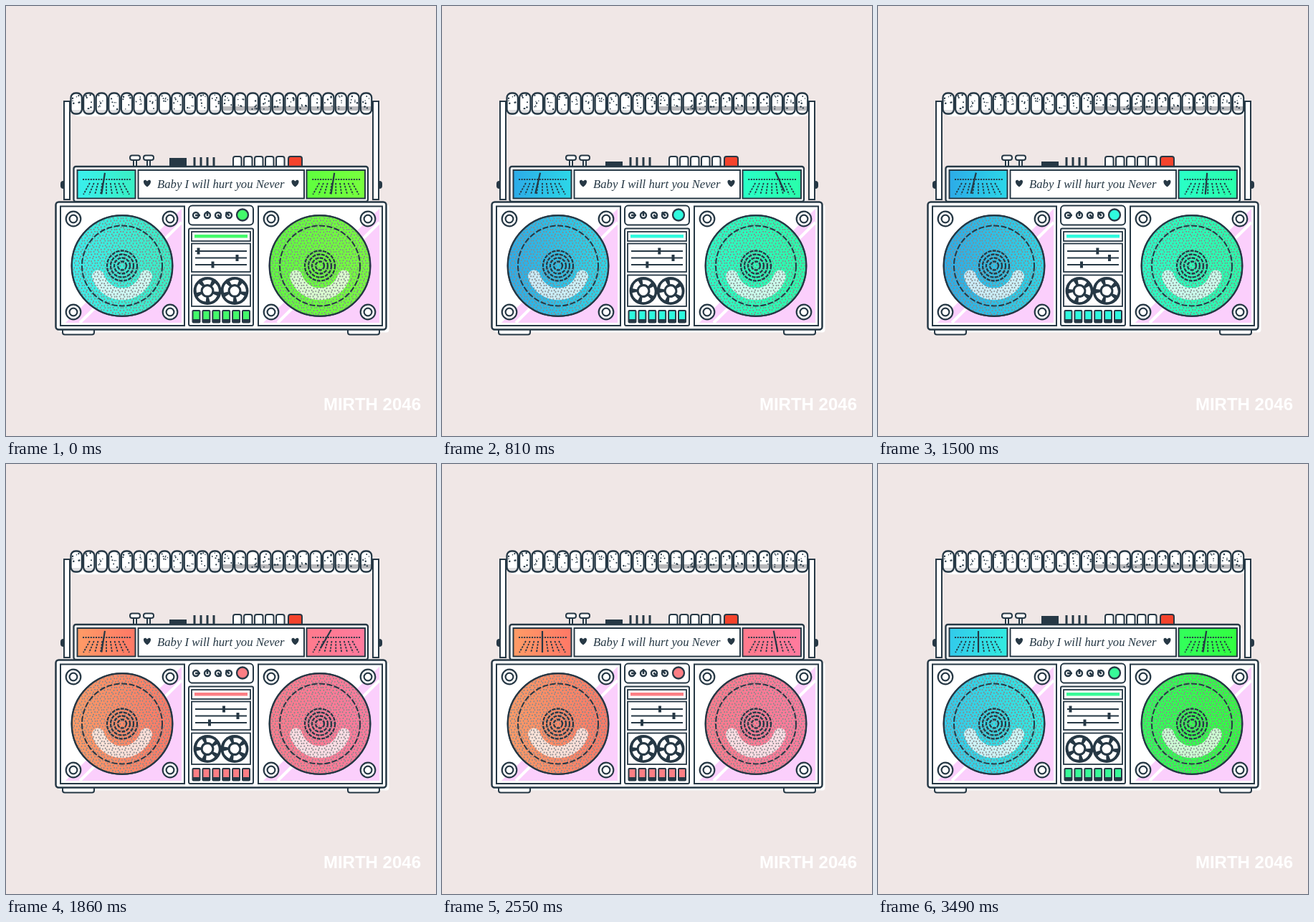
Recreate the animation shown at these times as an HTML page. Size 600x600 px, loop 3520 ms.

```html
<!DOCTYPE html>
<html lang="en">
<head>
<meta charset="utf-8">
<title>Boombox</title>
<style>
html, body { margin: 0; width: 100%; height: 100%; overflow: hidden; background: #f0e7e6; }
svg { display: block; width: 600px; height: 600px; }
.label { font: italic 16.7px "Liberation Serif", "Times New Roman", serif; fill: #263845; }
.sign { font: bold 24px "Liberation Sans", Arial, sans-serif; fill: #fff; }
</style>
</head>
<body>
<svg id="stage" viewBox="0 0 600 600"></svg>
<script>
const LOOP = 3520, STEP = 30, LAST = 3490;
const INK = '#263845', PINK = '#fbcffc';
const stage = document.getElementById('stage');
const NS = 'http://www.w3.org/2000/svg';

function add(tag, attrs, parent = stage, text) {
  const el = document.createElementNS(NS, tag);
  for (const k in attrs) el.setAttribute(k, attrs[k]);
  if (text) el.textContent = text;
  parent.appendChild(el);
  return el;
}
// Rectangle given by its corners
const box = (x1, y1, x2, y2, rx = 0, o = {}, p) =>
  add('rect', { x: x1, y: y1, width: x2 - x1, height: y2 - y1, rx, fill: '#fff', stroke: INK, 'stroke-width': 2, ...o }, p);
const disc = (cx, cy, r, o = {}, p) =>
  add('circle', { cx, cy, r, fill: 'none', stroke: INK, 'stroke-width': 2, ...o }, p);
const path = (d, o = {}, p) =>
  add('path', { d, fill: 'none', stroke: INK, 'stroke-width': 2, ...o }, p);
const plain = { stroke: 'none' };

let seed = 17;
const rnd = () => (seed = seed * 16807 % 2147483647) / 2147483647;

const defs = add('defs', {});
const mesh = add('pattern', { id: 'mesh', width: 18, height: 31.2, patternUnits: 'userSpaceOnUse' }, defs);
const dots = { stroke: '#87898c', 'stroke-width': 2.1, 'stroke-linecap': 'round' };
for (const [x, y] of [[0, 0], [18, 0], [0, 31.2], [18, 31.2], [9, 15.6]]) {
  disc(x, y, 7.6, { ...dots, 'stroke-dasharray': '.1 3.88' }, mesh);
  disc(x, y, 3.4, { ...dots, 'stroke-dasharray': '.1 3.46' }, mesh);
}
function gradient(id) {
  const g = add('linearGradient', { id }, defs);
  return [0, 1].map(offset => add('stop', { offset }, g));
}
const stops = { left: gradient('left'), right: gradient('right') };

// White offset shadows
box(73, 277, 534.5, 455.5, 4, { fill: '#fff', ...plain });
box(98, 228, 508.5, 274, 3, { fill: '#fff', ...plain });
box(93, 125, 513, 154, 8, { fill: '#fff', ...plain });

// Handle
for (const x of [76, 517]) box(x, 244, x + 8, 255, 4, { fill: INK, ...plain });
for (const x of [81, 512]) box(x, 133, x + 8, 270);
for (let i = 0; i < 24; i++) {
  const x = 90.5 + i * 17.58;
  const shade = i > 11 ? '#b9b9bc' : '#dfdfe1';
  box(x, 121.5, x + 15.4, 150.5, 6.5, plain);
  path(`M${x} ${i > 11 ? 140 : 145}h15.4v4q0 2-7 2h-2q-6.4 0-6.4-2z`, { fill: shade, ...plain });
  for (let k = 0; k < 7; k++)
    disc(x + 2.5 + rnd() * 10.5, 124 + rnd() * 20, .7 + rnd() * .6, { fill: INK, ...plain });
  box(x, 121.5, x + 15.4, 150.5, 6.5, { fill: 'none', 'stroke-width': 2.3 });
}

// Controls on the top edge
for (const x of [180, 199]) {
  box(x - 2, 214, x + 2, 225);
  box(x - 7, 208.5, x + 7, 215, 3);
}
const key = box(228, 212, 252, 226, 0, { fill: INK, ...plain });
for (let i = 0; i < 4; i++) path(`M${263 + i * 9} 211v14`, { 'stroke-width': 3 });
for (let x = 317; x < 380; x += 15) box(x, 210, x + 11.5, 226, 3);
box(394, 210, 413, 227, 3, { fill: '#f4432c' });

// Upper unit
box(94.5, 224, 505, 273, 3, { 'stroke-width': 2.3 });
box(184.5, 229, 416, 268.5);
add('text', { x: 211, y: 254, class: 'label' }, stage, 'Baby I will hurt you Never');
for (const x of [197, 403.5])
  path(`M${x} 252.5C${x - 9} 246 ${x - 4} 239.5 ${x} 244.5C${x + 4} 239.5 ${x + 9} 246 ${x} 252.5z`, { fill: INK, ...plain });

function meter(x1, x2, side) {
  const cx = (x1 + x2) / 2;
  box(x1, 229, x2, 268.5, 0, { fill: `url(#${side})` });
  path(`M${cx - 33} 242h67`, { 'stroke-width': 2, 'stroke-dasharray': '2 1.6' });
  for (let d = -32; d <= 32; d += 8)
    path(`M${cx + d * .72} 247L${cx + d} 263`, { 'stroke-width': 1.8, 'stroke-dasharray': '2.6 1.6' });
  const needle = path(`M${cx} 233V263`, { 'stroke-width': 2.2 });
  return a => needle.setAttribute('transform', `rotate(${-a} ${cx} 220)`);
}
const turnLeft = meter(99.5, 180.5, 'left');
const turnRight = meter(419.5, 501, 'right');

// Body
for (const x of [79, 477]) box(x, 449, x + 44, 458.5, 3);
box(69.5, 273.5, 530.5, 451.5, 4, { 'stroke-width': 2.5 });

function speaker(x, side) {
  const cx = x + 86, cy = 362.5;
  box(x, 279.5, x + 173, 446);
  path(`M${x + 169} 283V442H${x + 7}z`, { fill: PINK, ...plain });
  path(`M${x + 169} 302L${x + 27} 442`, { stroke: '#fff', 'stroke-width': 4 });
  for (const dx of [18, 153]) for (const y of [297, 427]) {
    disc(x + dx, y, 10.3, { fill: '#fff', 'stroke-width': 2.2 });
    disc(x + dx, y, 5.4, { 'stroke-width': 2.2 });
  }
  disc(cx, cy, 70.3, { fill: `url(#${side})` });
  path(`M${cx - 33.5} 377A35 35 0 0 0 ${cx + 33.5} 377`,
    { stroke: '#fff', 'stroke-opacity': .76, 'stroke-width': 17, 'stroke-linecap': 'round' });
  disc(cx, cy, 69, { fill: 'url(#mesh)', ...plain });
  disc(cx, cy, 70.3, { 'stroke-width': 2.3 });
  disc(cx, cy, 56, { 'stroke-width': 2, 'stroke-dasharray': '8 2.5' });
  for (const r of [21, 16, 11, 6]) disc(cx, cy, r, { 'stroke-width': 2.3, 'stroke-dasharray': '5 1.4' });
}
speaker(76, 'left');
speaker(352, 'right');

// Centre column
box(255, 278.5, 345, 305.5, 5);
[[265, 90], [281, 0], [296, 135], [311, -45]].forEach(([x, a]) => {
  disc(x, 292, 4, { 'stroke-width': 2.4 });
  path(`M${x} 293V286`, { transform: `rotate(${a} ${x} 292)`, 'stroke-width': 2.6 });
});
const tinted = [disc(330, 291.5, 8, { 'stroke-width': 2.3 })];
box(255, 310.5, 345, 446, 2);
box(259, 315, 341, 328, 0, { 'stroke-width': 1.8 });
tinted.push(box(263, 319, 337, 323.5, 0, plain));
box(259, 331.5, 341, 371, 0, { 'stroke-width': 1.8 });
const grips = [342, 351.5, 361].map(y => {
  path(`M264 ${y}H336`, { 'stroke-width': 1.8 });
  return box(-2, y - 4.5, 2, y + 4.5, 0, { fill: INK, ...plain });
});
box(259, 375.5, 341, 419, 0, { 'stroke-width': 1.8 });
const reels = [281, 319].map(x => {
  disc(x, 397.5, 19.5, { fill: INK, ...plain });
  const g = add('g', {});
  for (let a = 0; a < 360; a += 72)
    path(`M${x - 3} 391L${x - 7} 384Q${x} 380 ${x + 6} 383L${x + 3} 391z`,
      { fill: '#fff', stroke: 'none', transform: `rotate(${a} ${x} 397.5)` }, g);
  disc(x, 397.5, 8, { 'stroke-width': 3 }, g);
  disc(x, 397.5, 6.3, { fill: '#fff', ...plain }, g);
  return a => g.setAttribute('transform', `rotate(${a} ${x} 397.5)`);
});
for (let i = 0; i < 6; i++) {
  const x = 260.5 + i * 13.9;
  tinted.push(box(x, 425, x + 10, 441.5, 1));
  box(x, 437, x + 10, 441.5, 0, { fill: INK, ...plain });
}

add('text', { x: 579, y: 564, class: 'sign', 'text-anchor': 'end' }, stage, 'MIRTH 2046');

// Motion: value of each part at the shared key times
const TIMES = [0, 480, 1170, 1860, 2550, 2790, 3490];
const TRACKS = {
  hue: [118, 360, 720, 1080, 1440, 1555, 1940],
  left: [-9, -9, -26, -9, 0, 0, 0],
  right: [-9, 29, 11, -30, 11, 11, -9],
  grips: [
    [268.5, 298.5, 308.5, 304, 304, 304, 268.5],
    [322.5, 322.5, 322.5, 323.5, 323.5, 323.5, 322.5],
    [288.5, 288.5, 284, 284, 279, 283.5, 288.5]
  ]
};

function at(track, t, swing = 0) {
  let i = 0;
  while (i < TIMES.length - 2 && t >= TIMES[i + 1]) i++;
  const span = TIMES[i + 1] - TIMES[i], u = (t - TIMES[i]) / span;
  const turns = Math.round(span / 230);
  return track[i] + (track[i + 1] - track[i]) * u + swing * Math.sin(2 * Math.PI * turns * u);
}

const rad = d => d * Math.PI / 180;
function draw(t) {
  const p = at(TRACKS.hue, t), s = Math.sin(rad(p)), c = Math.cos(rad(p));
  const light = 64 + 8 * c;
  const hsl = (h, sat, l = light) => `hsl(${h.toFixed(1)},${sat}%,${l.toFixed(1)}%)`;
  stops.left.forEach((el, i) => el.setAttribute('stop-color', hsl(14 + p + 46 * s + (i ? -7 : 7), 90 + 10 * c, light - 2)));
  stops.right.forEach((el, i) => el.setAttribute('stop-color', hsl(348 + p + (i ? -4 : 4), 100, light + 2)));
  tinted.forEach(el => el.setAttribute('fill', hsl(p - 3 + 20 * s, 95, light + 2)));
  turnLeft(at(TRACKS.left, t, 10));
  turnRight(at(TRACKS.right, t, 10));
  grips.forEach((el, i) => el.setAttribute('transform', `translate(${at(TRACKS.grips[i], t)} 0)`));
  reels.forEach(turn => turn(t / LOOP * 720));
  const down = Math.max(0, Math.min(1, (t - 90) / 90, (2760 - t) / 60));
  key.setAttribute('y', 212 + 5 * down);
  key.setAttribute('height', 12 - 5 * down);
}

const start = performance.now();
function tick() {
  const t = Math.max(0, performance.now() - start) % LOOP;
  draw(t >= LAST ? LAST : Math.floor(t / STEP) * STEP);
  requestAnimationFrame(tick);
}
tick();
</script>
</body>
</html>
```
